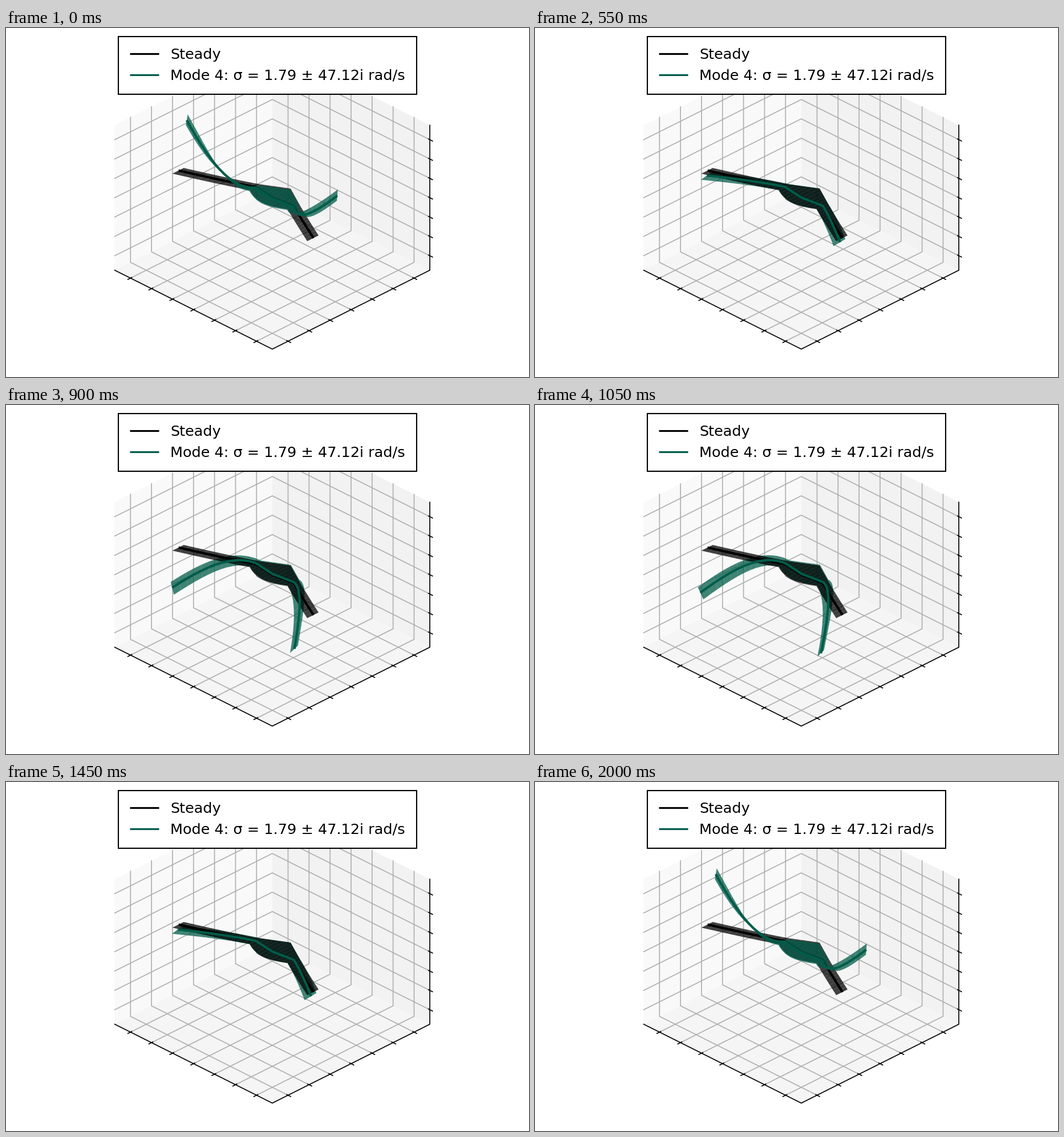
Animation, 917 px wide and 611 px high, one loop 2050 ms. Source, as a matplotlib script:

```python
import numpy as np
import matplotlib.pyplot as plt
from matplotlib.animation import FuncAnimation
from matplotlib.collections import LineCollection, PolyCollection
from matplotlib.lines import Line2D

W, H, DPI = 917, 611, 128
FRAMES, INTERVAL = 41, 50
GREEN = (0, 0.36, 0.285)
LIM = 3.75
TICKS = np.arange(-3, 4)

plt.rcParams["font.family"] = "DejaVu Sans"


def pt(px):
    return px * 72 / DPI


def project(p):
    """Orthographic view of 3D points, in pixels."""
    x, y, z = np.moveaxis(np.asarray(p, float), -1, 0)
    return np.stack([466.9 + 36.83 * (x + y),
                     297.1 + 18.41 * (x - y) - 33.86 * z], axis=-1)


# Right half of the aircraft: a blended body followed by a swept wing
ROOT = np.array([0.9, 0.12, 0.0])
TIP_MOVE = np.array([0.375, 0.76, 1.98])
AXIS = np.array([0.92, 0.27, -0.267])
AXIS /= np.linalg.norm(AXIS)
TIP_TWIST = np.radians(-102)

u = np.linspace(0, 1, 6)[:-1]
s = np.linspace(0, 1, 13)
zero = np.zeros_like(u)

body = u[:, None] * ROOT
wing = ROOT + np.stack([2.31 * s, -1.37 * s, 0.34 * s ** 1.2], axis=1)
beam = np.vstack([body, wing])
span = np.concatenate([zero, s])

front = np.concatenate([0.87 - 0.507 * u - 0.12 * u, 0.243 + 0 * s])
rear = np.concatenate([-0.47 + 0.293 * u ** 1.8 - 0.12 * u, -0.297 + 0 * s])

bend = -0.02 - 0.367 * span + 1.92 * span ** 2 - 0.533 * span ** 3
twist = TIP_TWIST * np.sin(np.pi / 2 * span)


def rotate_chord(angle):
    """Unit chord vector (0, 1, 0) turned about AXIS."""
    y = np.array([0.0, 1.0, 0.0])
    c, sn = np.cos(angle)[:, None], np.sin(angle)[:, None]
    return y * c + np.cross(AXIS, y) * sn + AXIS * AXIS[1] * (1 - c)


def both_sides(p):
    return np.vstack([(p * [-1, 1, 1])[:0:-1], p])


def shape(amp):
    """Pixel midline and chordwise strips at a modal amplitude."""
    mid = beam + amp * bend[:, None] * TIP_MOVE
    mid[0, 0] = 0
    chord = rotate_chord(amp * twist)
    line, le, te = (project(both_sides(mid + k[:, None] * chord))
                    for k in (0 * front, front, rear))
    strips = np.stack([le[:-1], le[1:], te[1:], te[:-1]], axis=1)
    return line, strips


fig = plt.figure(figsize=(W / DPI, H / DPI), dpi=DPI, facecolor="white")
ax = fig.add_axes([0, 0, 1, 1])
ax.set_xlim(0, W)
ax.set_ylim(H, 0)
ax.axis("off")


def lines(segs, color, width, z):
    ax.add_collection(LineCollection([project(q) for q in segs], colors=[color],
                                     linewidths=pt(width), zorder=z,
                                     capstyle="projecting"))


# Panes: left wall, right wall, floor
L = LIM
walls = [[(-L, -L, -L), (-L, L, -L), (-L, L, L), (-L, -L, L)],
         [(-L, L, -L), (L, L, -L), (L, L, L), (-L, L, L)],
         [(-L, -L, -L), (L, -L, -L), (L, L, -L), (-L, L, -L)]]
for quad, shade in zip(walls, (0.975, 0.95, 0.9625)):
    ax.fill(*project(quad).T, color=str(shade), lw=0, zorder=0)

grid, marks = [], []
OUT, IN = 0.125, 0.0625
for t in TICKS:
    grid += [[(t, -L, -L), (t, L, -L), (t, L, L)],
             [(L, t, -L), (-L, t, -L), (-L, t, L)],
             [(-L, -L, t), (-L, L, t), (L, L, t)]]
    marks += [[(t, -L - OUT, -L), (t, -L + IN, -L)],
              [(L + OUT, t, -L), (L - IN, t, -L)],
              [(L + OUT, L, t), (L - IN, L, t)]]
lines(grid, "#b0b0b0", 1.7, 1)
lines([[(-L, -L, -L), (L, -L, -L), (L, L, -L), (L, L, L)]], "black", 1.7, 2)
lines(marks, "black", 1.7, 2)


def add_wing(color, z):
    line, strips = shape(0)
    surf = PolyCollection(strips, facecolors=[color], edgecolors="none",
                          linewidths=0, alpha=0.75, zorder=z)
    ax.add_collection(surf)
    beam_line, = ax.plot(*line.T, color=color, lw=pt(4.2), zorder=z + 1,
                         solid_capstyle="butt", solid_joinstyle="round")
    return surf, beam_line


add_wing("black", 4)
mode_surf, mode_line = add_wing(GREEN, 6)

handles = [Line2D([], [], color=c, lw=pt(3.2), solid_capstyle="butt")
           for c in ("black", GREEN)]
legend = ax.legend(handles, ["Steady", "Mode 4: σ = 1.79 ± 47.12i rad/s"],
                   loc="upper center", bbox_to_anchor=(458.5, 14.5),
                   bbox_transform=ax.transData, fontsize=pt(25.47),
                   borderpad=0.8, borderaxespad=0, labelspacing=0.5,
                   handlelength=2, handletextpad=0.8, fancybox=False,
                   framealpha=1, edgecolor="black", facecolor="white")
legend.get_frame().set_linewidth(pt(2.1))
legend.set_zorder(10)


def update(i):
    amp = abs(i - 20) / 10 - 1
    line, strips = shape(amp)
    mode_surf.set_verts(strips)
    mode_surf.set_zorder(6 if amp > 0 else 3)
    mode_line.set_data(*line.T)
    return mode_surf, mode_line


anim = FuncAnimation(fig, update, frames=FRAMES, interval=INTERVAL,
                     repeat=True, repeat_delay=0, blit=False)
plt.show()
```
